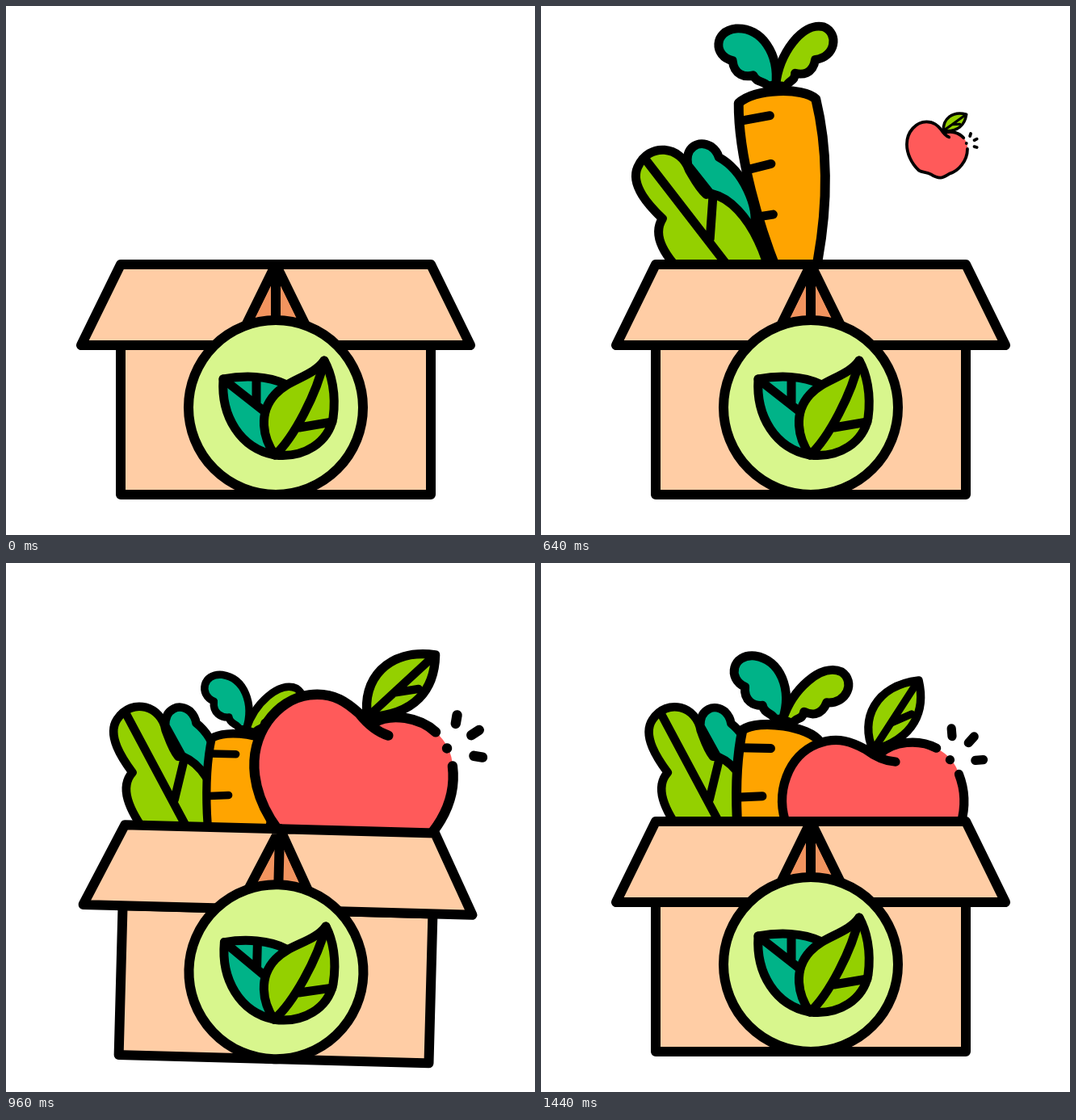
Animation, 655 px wide and 655 px high, one loop 2.48 s. Source, as an HTML page with a canvas:

```html
<!DOCTYPE html>
<html lang="en">
<head>
<meta charset="utf-8">
<title>Vegetable box</title>
<style>
html, body { margin: 0; width: 100%; height: 100%; overflow: hidden; background: #fff; }
canvas { display: block; width: 100%; height: 100%; }
</style>
</head>
<body>
<canvas id="stage" width="655" height="655"></canvas>
<script>
const ctx = document.getElementById('stage').getContext('2d');
const LOOP = 2480, STEP = 40;
const GREEN = '#94d000', TEAL = '#00b388', ORANGE = '#ffa400', RED = '#ff5a5a';
const CARD = '#ffcda5', INNER = '#f2945f', LIME = '#d8f68d';

// A part has a path, an optional fill and a line width; zero means no outline.
const part = (d, fill, width = 12) => ({ path: new Path2D(d), fill, width });

const lettuce = [
  part('M104 128C90 108 103 90 122 92Q132 94 138 101C175 104 215 140 221 170L150 152Z', TEAL),
  part('M150 150C200 140 275 210 288 262L282 274C265 286 220 286 170 270C125 254 98 235 102 208' +
       'C80 200 43 185 43 158C43 120 85 108 108 133C118 140 130 150 143 154Z', GREEN),
  part('M50 145L284 271M172 207L152 152M172 269L220 239')
];

const carrot = [
  part('M290 101C294 62 272 29 240 31C212 34 212 66 236 71C238 89 252 92 262 89C266 99 275 95 280 102Z', TEAL, 11),
  part('M290 101C294 62 322 22 349 28C369 36 364 66 339 69C336 88 322 88 314 86C314 97 306 94 303 103Z', GREEN, 11),
  part('M244 124C262 105 325 103 340 118C358 190 354 260 344 318C338 352 306 358 294 334C270 275 244 190 244 124Z', ORANGE),
  part('M246 146L283 139M258 206L285 199M270 265L288 262', null, 11)
];

const skin = 'M590 198C590 245 555 285 520 295C500 308 492 311 484 311C470 310 455 302 447 297' +
  'C430 287 415 291 400 282C370 255 353 215 353 180C353 130 390 92 430 92C460 92 475 108 487 122';
const shoulder = '502 135C525 125 558 135 575 155';
const apple = [
  part(`${skin}L${shoulder}Q592 175 590 198Z`, RED, 0),
  part(`${skin}C495 135 505 146 518 152M${shoulder}`),
  part('M586 176h.1M603 138L600 148M617 164L627 159M617 189L627 192'),
  part('M496 127C494 82 530 48 586 63C580 104 553 132 496 127Z', GREEN, 11),
  part('M496 127L584 64M531 102L561 101', null, 10)
];

const MID = 334, TOP = 320, RIM = 420, BASE = 605;
const flap = side => part(`M${MID} ${TOP}h${192 * side}l${49 * side} 100h${-192 * side}Z`, CARD);
const box = [
  part(`M142 ${RIM}H526V${BASE}H142Z`, CARD),
  part(`M${MID} ${TOP}l-49 100h98Z`, INNER),
  part(`M${MID} ${TOP}v75`),
  flap(-1),
  flap(1),
  part(`M${MID} 389a108 108 0 0 1 0 216a108 108 0 0 1 0 -216Z`, LIME),
  part('M269 462C295 457 325 458 345 468L333 556C290 548 266 508 269 462Z', TEAL, 11),
  part('M269 462L320 502M310 463V492', null, 11),
  part('M394 439C380 459 350 462 333 481C312 504 318 535 333 556C370 560 399 540 405 510C409 480 403 455 394 439Z', GREEN, 11),
  part('M394 439C385 480 356 535 333 556M363 522L404 515', null, 11)
];

// Each item pops up at `start`, leaves `from` at `drop`, and its scale goes peak, land, rest.
const items = [
  { parts: lettuce, pivot: [164, 188], start: 231, drop: 345, from: [135, 151], to: [212, 275],
    turn: 33.6, peak: 1.04, land: .91, rest: .88 },
  { parts: carrot, pivot: [295, 188], start: 434, drop: 532, from: [298, 165], to: [286, 280],
    turn: 12, peak: 1.05, land: .83, rest: 1 },
  { parts: apple, pivot: [470, 195], start: 599, drop: 732, from: [490, 176], to: [412, 300],
    turn: -21.5, peak: 1, land: 1.04, rest: .935 }
];
const POP = 200, FALL = 330, SETTLE = 380;

const progress = (t, start, length) => Math.min(1, Math.max(0, (t - start) / length));
const smooth = u => u * u * (3 - 2 * u);
const mix = (a, b, u) => a + (b - a) * u;

function draw(parts, pivot, x, y, angle, scale) {
  ctx.save();
  ctx.translate(x, y);
  ctx.rotate(angle * Math.PI / 180);
  ctx.scale(scale, scale);
  ctx.translate(-pivot[0], -pivot[1]);
  for (const { path, fill, width } of parts) {
    if (fill) {
      ctx.fillStyle = fill;
      ctx.fill(path);
    }
    if (width) {
      ctx.lineWidth = width;
      ctx.stroke(path);
    }
  }
  ctx.restore();
}

function drawItem({ parts, pivot, start, drop, from, to, turn, peak, land, rest }, t) {
  if (t < start) return;
  const pop = Math.sin(progress(t, start, POP) * Math.PI / 2);
  const u = progress(t, drop, FALL), fall = smooth(u);
  const settle = smooth(progress(t, drop + FALL, SETTLE));
  // The height lags the sideways move, and the turn comes last.
  const x = mix(from[0], to[0], fall);
  const y = mix(from[1], to[1], smooth(u ** 1.2));
  const size = mix(mix(peak, land, fall), rest, settle);
  draw(parts, pivot, x, y, turn * u ** 3, pop * size);
}

function drawBox(t) {
  // A quick dip under the apple and a slower return.
  const dip = Math.sin(Math.PI * Math.sqrt(progress(t, 880, 440)));
  draw(box, [MID, BASE], MID - 2.5 * dip, BASE + 9.5 * dip, 1.57 * dip, 1);
}

function render(t) {
  ctx.fillStyle = '#fff';
  ctx.fillRect(0, 0, 655, 655);
  ctx.strokeStyle = '#000';
  ctx.lineCap = ctx.lineJoin = 'round';
  for (const item of items) drawItem(item, t);
  drawBox(t);
}

const begin = performance.now();
function tick() {
  const t = (performance.now() - begin) % LOOP;
  render(Math.floor(t / STEP) * STEP);
  requestAnimationFrame(tick);
}
tick();
</script>
</body>
</html>
```
